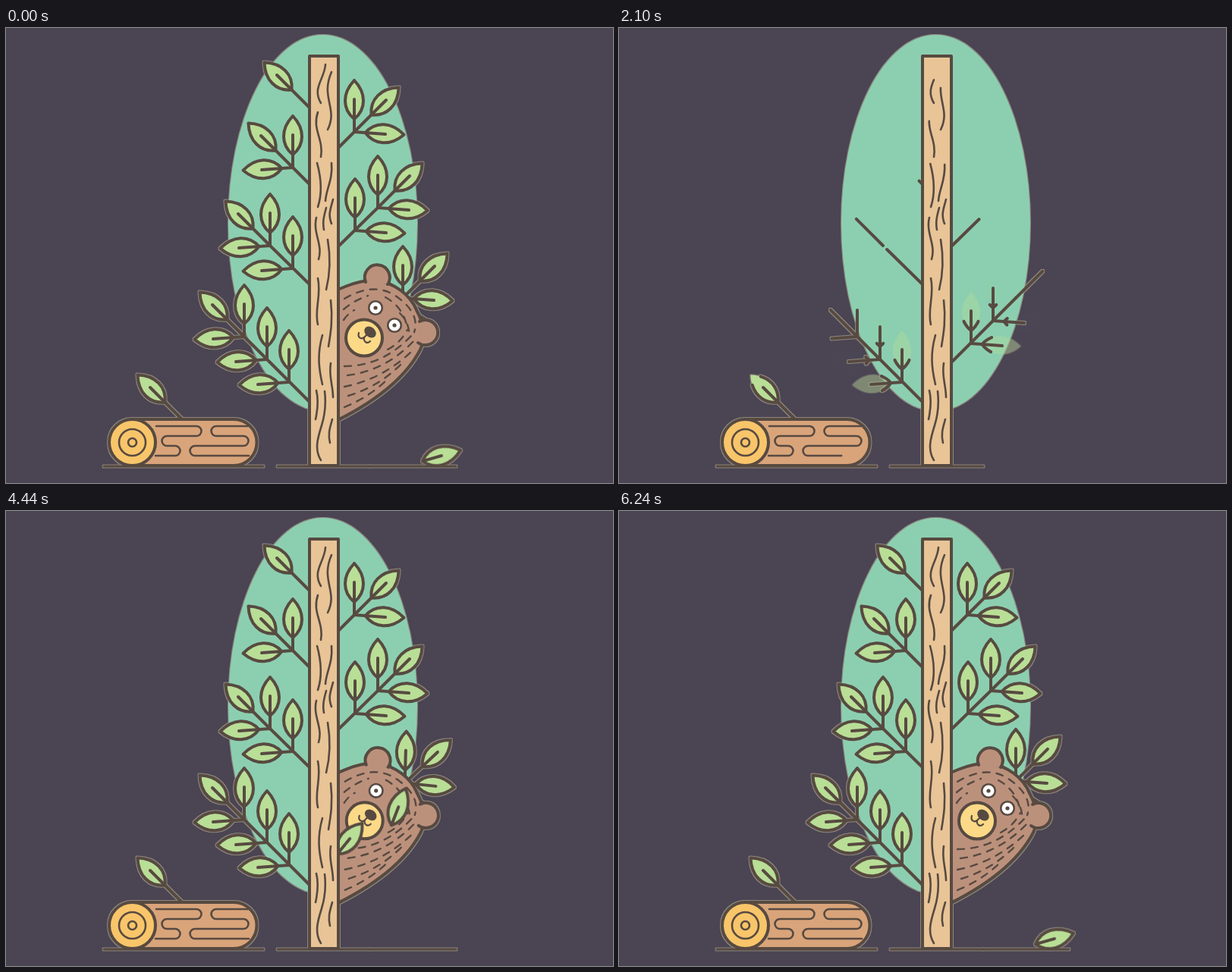
Recreate the animation shown at these times as an HTML page without scripts. Size 800x600 px, loop 9420 ms.

```html
<!DOCTYPE html>
<html lang="en">
<head>
<meta charset="utf-8">
<title>Bear behind the tree</title>
<style>
/* --t is the clock in ms; each part derives its pose from it */
@property --t { syntax: "<number>"; inherits: true; initial-value: 9420; }
@keyframes clock { 0%, .318% { --t: 9420; } .3185% { --t: 30; } to { --t: 9420; } }
html, body { margin: 0; width: 100%; height: 100%; overflow: hidden; background: #4a4453; }
svg {
  display: block; width: 100%; height: 100%;
  animation: clock 9.42s linear infinite;
  fill: none; stroke: #574a41; stroke-width: 4; stroke-linecap: round; stroke-linejoin: round;
}

/* line drawing */
.draw, .grow {
  --p: clamp(0, (var(--t) - var(--d)) / var(--w, 500), 1);
  opacity: calc(var(--p) * 1000);
  stroke-dasharray: calc(var(--p) * 1px) 9px;
}
/* twig first, then the leaf outline and its fill */
.grow {
  --w: 900;
  stroke-dasharray: calc(var(--p) * 1.5px) 9px;
  fill: #b9de96;
  fill-opacity: clamp(0, (var(--p) - .33) * 3, 1);
}
.thin { stroke-width: 2.6; }
.pop {
  --u: calc(max(0, var(--t) - var(--d)) / 1000);
  transform: scale(calc(1 - exp(-11 * var(--u)) * cos(9 * var(--u))));
}
.crown { --d: 1330; fill: #8ccfb0; stroke: none; transform-origin: 417.5px 505px; }
.face { --d: 650; fill: #f8c56a; transform-origin: 166px 547px; }
.bark { fill: #d9a47a; fill-opacity: clamp(0, (var(--t) - 1550) / 350, 1); }
.rise { transform: translateY(calc(580px - 610px * clamp(0, (var(--t) - var(--d)) / 600, 1))); }

.sway {
  --u: calc(max(0, var(--t) - 3880) / 1000);
  transform-origin: 439px 441px;
  transform: rotate(calc(29.4deg * exp(-2.84 * var(--u)) * sin(5.067 * var(--u))));
}
.bear {
  --u: calc(max(0, var(--t) - 3840) / 1000);
  --q: calc(exp(-9 * var(--u)) * cos(5 * var(--u)));
  transform: translate(calc(-160px * var(--q)), calc(50px * var(--q)));
}
.skin { fill: #bc917c; }
.fur { stroke-width: 2.4; stroke-dasharray: 9 9; }
.eye {
  --b: calc((var(--t) - 5925) / 80);
  transform-box: fill-box; transform-origin: center;
  transform: scaleY(clamp(.12, max(var(--b), -1 * var(--b)), 1));
}

.fall { fill: #b9de96; animation: 9.42s linear infinite; }
.far { animation-name: far; }
.near { animation-name: near; }
@keyframes far {
  0%, 44% { transform: translate(495px, 350px) rotate(5deg); opacity: 0; }
  44.01% { transform: translate(495px, 350px) rotate(5deg); opacity: 1; }
  47.13% { transform: translate(517px, 390px) rotate(21deg); }
  50.96% { transform: translate(594px, 436px) rotate(34deg); }
  56.05% { transform: translate(714px, 501px) rotate(3deg); opacity: 1; }
  61.5%, 100% { transform: translate(845px, 548px) rotate(-30deg); opacity: 1; }
}
@keyframes near {
  0%, .318% { transform: translate(574px, 564px) rotate(74deg); opacity: 1; }
  .3185%, 44% { transform: translate(464px, 372px) rotate(0deg); opacity: 0; }
  44.01% { transform: translate(464px, 372px) rotate(0deg); opacity: 1; }
  47.13% { transform: translate(453px, 432px) rotate(39deg); }
  51.5% { transform: translate(493px, 464px) rotate(62deg); }
  56.05% { transform: translate(540px, 491px) rotate(45deg); animation-timing-function: ease-out; }
  64%, 100% { transform: translate(574px, 564px) rotate(74deg); opacity: 1; }
}
</style>
</head>
<body>
<svg viewBox="0 0 800 600">
  <defs>
    <path id="leaf" pathLength="2" stroke-dashoffset=".4" d="M0 0C-16-13-16-34 0-51M0 0C16-13 16-34 0-51"/>
    <g id="tip">
      <use href="#leaf" transform="translate(-22.5 -22.5) rotate(-45)"/>
      <path pathLength=".4" fill="none" d="M0 0L-42-42"/>
    </g>
    <g id="pair">
      <use href="#leaf" transform="translate(0 -17)"/>
      <use href="#leaf" transform="translate(-14.5 1) rotate(-93)"/>
      <path pathLength=".4" fill="none" d="M0 0V-43"/>
      <path pathLength=".4" fill="none" d="M0 0L-41 3"/>
    </g>
    <g id="loose">
      <path d="M0 26C-16 13-16-8 0-26C16-8 16 13 0 26V0"/>
    </g>
    <linearGradient id="soft" x2="0" y2="1">
      <stop stop-color="#fff" stop-opacity="0"/>
      <stop offset=".07" stop-color="#fff"/>
    </linearGradient>
    <mask id="edgeMask" maskUnits="userSpaceOnUse" x="0" y="0" width="800" height="600">
      <rect class="rise" style="--d:1020" x="390" width="60" height="640" fill="url(#soft)" stroke="none"/>
    </mask>
    <mask id="woodMask" maskUnits="userSpaceOnUse" x="0" y="0" width="800" height="600">
      <rect class="rise" style="--d:1080" x="390" width="60" height="680" fill="url(#soft)" stroke="none"/>
    </mask>
    <clipPath id="behind"><path d="M420 0H800V600H420z"/></clipPath>
    <filter id="halo" filterUnits="userSpaceOnUse" x="0" y="0" width="800" height="600" color-interpolation-filters="sRGB">
      <feMorphology in="SourceAlpha" operator="dilate" radius="1" result="wide"/>
      <feFlood flood-color="#e4deb4" flood-opacity=".42"/>
      <feComposite in2="wide" operator="in"/>
      <feMerge><feMergeNode/><feMergeNode in="SourceGraphic"/></feMerge>
    </filter>
  </defs>

  <g filter="url(#halo)">
    <ellipse class="crown pop" cx="417.5" cy="257" rx="124.5" ry="248"/>

    <!-- left branches -->
    <path class="draw" style="--d:1440" pathLength="1" d="M400 493L314 407"/>
    <use class="grow" style="--d:1900" href="#tip" x="314" y="407"/>
    <use class="grow" style="--d:1905" href="#pair" x="314" y="407"/>
    <use class="grow" style="--d:1800" href="#pair" x="344" y="437"/>
    <use class="grow" style="--d:1700" href="#pair" x="373" y="467"/>

    <path class="draw" style="--d:1650" pathLength="1" d="M400 338L348 287"/>
    <use class="grow" style="--d:1900" href="#tip" x="348" y="287"/>
    <use class="grow" style="--d:2510" href="#pair" x="348" y="287"/>
    <use class="grow" style="--d:2430" href="#pair" x="378" y="317"/>

    <path class="draw" style="--d:2000" pathLength="1" d="M400 206L378 184"/>
    <use class="grow" style="--d:2520" href="#tip" x="378" y="184"/>
    <use class="grow" style="--d:2640" href="#pair" x="378" y="184"/>

    <use class="grow" style="--d:2640" href="#tip" x="399" y="104"/>

    <!-- right branches, mirrored -->
    <g class="sway">
      <path class="draw" style="--d:1460" pathLength="1" d="M438 441L523 356"/>
      <g transform="matrix(-1 0 0 1 523 356)">
        <use class="grow" style="--d:1900" href="#tip"/>
        <use class="grow" style="--d:2400" href="#pair"/>
        <use class="grow" style="--d:1800" href="#pair" x="30" y="30"/>
        <use class="grow" style="--d:1700" href="#pair" x="59" y="60"/>
      </g>
    </g>
    <path class="draw" style="--d:1750" pathLength="1" d="M438 288L490 237"/>
    <g transform="matrix(-1 0 0 1 490 237)">
      <use class="grow" style="--d:2280" href="#tip"/>
      <use class="grow" style="--d:2640" href="#pair"/>
      <use class="grow" style="--d:2510" href="#pair" x="30" y="30"/>
    </g>
    <path class="draw" style="--d:2100" pathLength="1" d="M438 158L459 137"/>
    <g transform="matrix(-1 0 0 1 459 137)">
      <use class="grow" style="--d:2520" href="#tip"/>
      <use class="grow" style="--d:2730" href="#pair"/>
    </g>

    <g clip-path="url(#behind)">
      <g class="bear">
        <path class="skin" d="M380 375C440 341 466 331 488 333C512 336 533 352 541 372C551 390 553 408 546 424C530 455 495 490 425 523L380 540z"/>
        <path class="skin" d="M474 335A16.5 16.5 0 1 1 503 338"/>
        <path class="skin" d="M545 387A16.5 16.5 0 1 1 543 415"/>
        <g class="fur">
          <path d="M446 357q40-24 70-2t22 46"/>
          <path d="M445 371q14-12 32-18M500 355q22 12 28 36"/>
          <path d="M445 385q6-9 14-13M519 376q14 14 12 32"/>
          <path d="M503 424q16-8 26-26M446 446q50 0 88-40"/>
          <path d="M450 458q50-6 88-46"/>
          <path d="M446 473q50-10 88-46"/>
          <path d="M451 485q40-12 70-42"/>
          <path d="M446 500q34-14 58-38"/>
        </g>
        <circle cx="472" cy="408.500" r="24" fill="#fbd987"/>
        <path d="M465 402c-2 6 3 9 7 6c-1 6 4 9 8 5M472 408l4-4" stroke-width="2.2"/>
        <ellipse cx="480" cy="401" rx="8.500" ry="6.500" transform="rotate(40 480 401)" fill="#574a41" stroke="none"/>
        <g class="eye">
          <circle cx="487" cy="369" r="8.800" fill="#fff" stroke-width="2.6"/>
          <circle cx="487" cy="369" r="2.600" fill="#574a41" stroke="none"/>
        </g>
        <g class="eye">
          <circle cx="512" cy="392" r="8.800" fill="#fff" stroke-width="2.6"/>
          <circle cx="512" cy="392" r="2.600" fill="#574a41" stroke="none"/>
        </g>
      </g>
    </g>

    <g class="fall far"><use href="#loose"/></g>

    <!-- ground -->
    <g stroke-width="3">
      <path class="draw" style="--d:100" pathLength="1" d="M129 578H339"/>
      <path class="draw" style="--d:250" pathLength="1" d="M358 578H480"/>
      <path class="draw" style="--d:3750;--w:480" pathLength="1" d="M480 578H593"/>
    </g>

    <g class="fall near"><use href="#loose"/></g>

    <!-- trunk -->
    <path mask="url(#woodMask)" fill="#e8c497" stroke="none" d="M400 37H438V577H400z"/>
    <g class="thin">
      <path class="draw" style="--d:1150" pathLength="1" d="M415 570c-9-14-4-30 1-46s6-28 4-45"/>
      <path class="draw" style="--d:1180" pathLength="1" d="M427 547c-3-12 0-20 3-31"/>
      <path class="draw" style="--d:1220" pathLength="1" d="M408 516c3-14 4-26 1-38"/>
      <path class="draw" style="--d:1260" pathLength="1" d="M431 487c0-16-6-28-3-45"/>
      <path class="draw" style="--d:1290" pathLength="1" d="M417 470c-5-22-7-40 0-65"/>
      <path class="draw" style="--d:1410" pathLength="1" d="M425 420c3-18 6-36 3-61"/>
      <path class="draw" style="--d:1440" pathLength="1" d="M411 391c-5-20 5-38 0-61"/>
      <path class="draw" style="--d:1460" pathLength="1" d="M422 345c5-20 6-42 2-66"/>
      <path class="draw" style="--d:1510" pathLength="1" d="M412 305c6-20-8-34-3-55"/>
      <path class="draw" style="--d:1570" pathLength="1" d="M419 266c-2-10 0-18 3-29"/>
      <path class="draw" style="--d:1580" pathLength="1" d="M429 258c-5-12-1-20 2-32"/>
      <path class="draw" style="--d:1610" pathLength="1" d="M411 236c6-18 5-36-1-58"/>
      <path class="draw" style="--d:1620" pathLength="1" d="M421 228c1-16 10-28 8-50"/>
      <path class="draw" style="--d:1700" pathLength="1" d="M415 170c4-24-12-36-4-59"/>
      <path class="draw" style="--d:1740" pathLength="1" d="M424 134c14-28-10-42 5-76"/>
      <path class="draw" style="--d:1800" pathLength="1" d="M415 99c-12-20 5-32 6-51"/>
    </g>
    <path mask="url(#edgeMask)" d="M400 577V37H438V577z"/>

    <!-- log -->
    <use class="grow" style="--d:1400" href="#tip" x="232" y="516"/>
    <path class="draw bark" style="--d:850" pathLength="1" d="M166 516H300a30.500 30.500 0 0 1 0 61H166"/>
    <g class="thin">
      <path class="draw" style="--d:1600" pathLength="1" d="M198 525H251a6.500 6.500 0 0 1 0 13H212a6.500 6.500 0 0 0 0 13H223a6.500 6.500 0 0 1 0 13H197"/>
      <path class="draw" style="--d:1650" pathLength="1" d="M320 525H277a6.500 6.500 0 0 0 0 13H313a6.500 6.500 0 0 1 0 13H249a6.500 6.500 0 0 0 0 13H320"/>
    </g>
    <g class="face pop">
      <circle cx="166.500" cy="546.500" r="30.500"/>
      <circle class="thin" cx="166.500" cy="546.500" r="17.500"/>
      <circle class="thin" cx="166.500" cy="546.500" r="5.500"/>
    </g>
  </g>
</svg>
</body>
</html>
```
